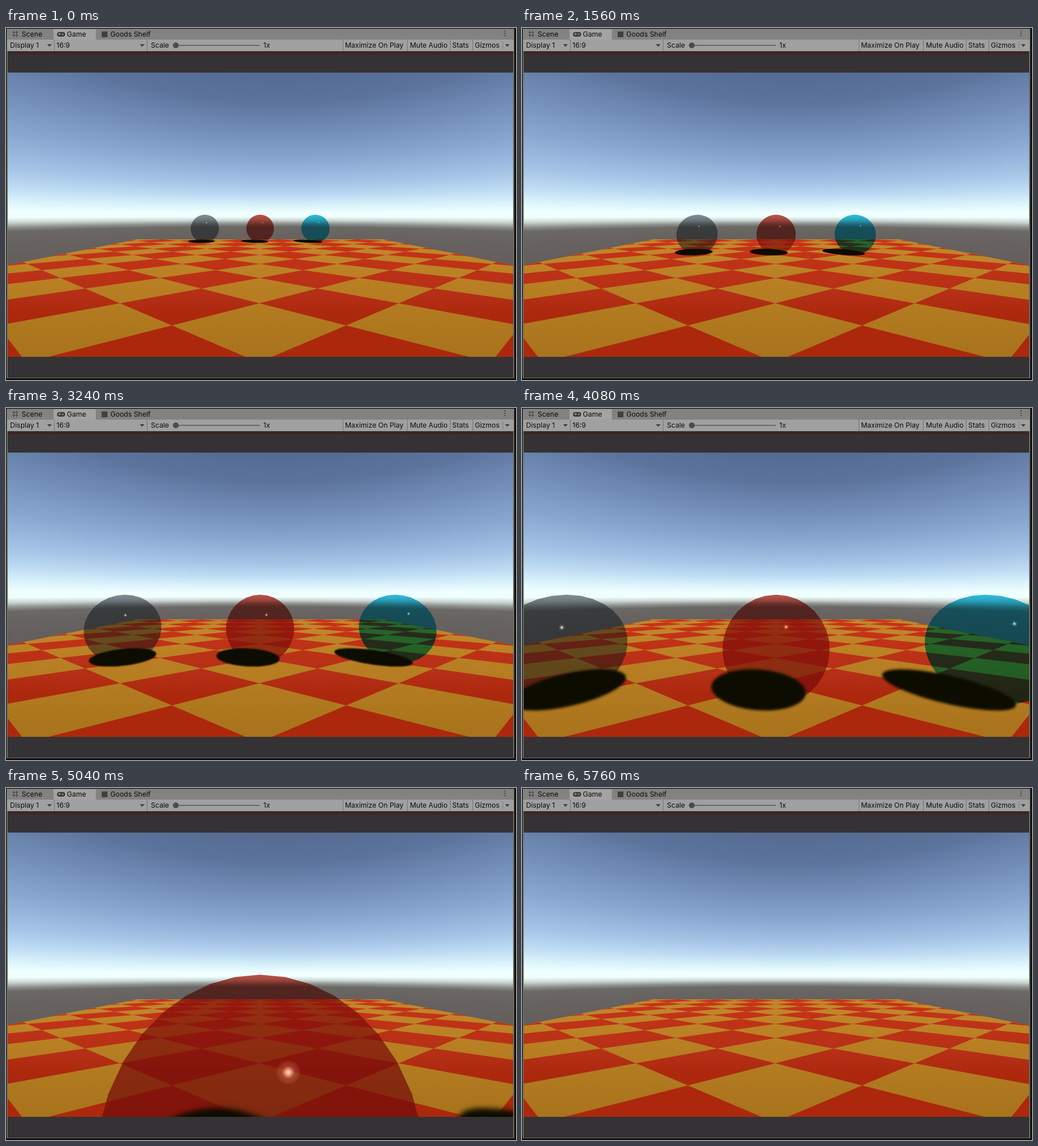
These frames come from a looping animation (880x608 px, 5850 ms). An HTML page with a canvas:

```html
<!DOCTYPE html>
<html>
<head>
<meta charset="utf-8">
<style>
html, body { margin: 0; width: 100%; height: 100%; overflow: hidden; background: #100f0a; }
canvas { display: block; }
</style>
</head>
<body>
<canvas id="stage" width="880" height="608"></canvas>
<script>
const LOOP = 5850, STEP = 60;
const CX = 438.5, CY = 322.5, FOCAL = 425.2, NEAR = 0.3, R = 0.5;
const VIEW = [3, 77, 872, 491];
const LIGHT = [0.321, 0.766, -0.557];
const ctx = document.getElementById('stage').getContext('2d');

// Seconds and distance of the balls from the camera
const PATH = [[0, 8.93], [1.56, 6.27], [2.22, 5.27], [3.24, 3.65], [4.08, 2.35], [5.04, 0.895], [5.76, -0.2]];
const BALLS = [
  { x: -2, tint: [128, 128, 136], glow: '235,225,215' },
  { x: 0, tint: [188, 72, 64], glow: '255,165,130' },
  { x: 2, tint: [44, 174, 206], glow: '150,220,240' }
];

const mix = (a, b, k) => a + (b - a) * k;
const rgb = c => `rgb(${c})`;

// Camera space (y up, z forward) to the stage
const project = ([x, y, z]) => [CX + FOCAL * x / z, CY - FOCAL * y / z];

function trace(c, pts) {
  c.beginPath();
  for (const p of pts) c.lineTo(...project(p));
  c.closePath();
}

const ring = (n, at) => Array.from({ length: n }, (_, i) => at(i / n * 2 * Math.PI));

function sample(stops, t) {
  let i = 1;
  while (i < stops.length - 1 && t > stops[i][0]) i++;
  const [a, b] = [stops[i - 1], stops[i]];
  const k = Math.min(1, Math.max(0, (t - a[0]) / (b[0] - a[0])));
  return a.slice(1).map((v, j) => mix(v, b[j + 1], k));
}

function drawSky(c) {
  const [x0, y0, w, h] = VIEW;
  const stops = [
    [-246, 84, 106, 146], [-195, 92, 116, 156], [-145, 112, 140, 182], [-95, 136, 166, 208],
    [-55, 164, 195, 230], [-32, 190, 220, 243], [-17, 216, 241, 250], [-4, 240, 255, 255],
    [3, 238, 255, 253], [9, 202, 214, 211], [15, 142, 144, 142], [20, 107, 105, 102],
    [30, 104, 100, 98], [80, 97, 90, 88]
  ];
  const img = c.createImageData(w, h);
  for (let y = 0, i = 0; y < h; y++) {
    for (let x = 0; x < w; x++, i += 4) {
      const above = y0 + y < CY;
      const u = (x0 + x - CX) / FOCAL - (above ? 0.08 : 0);
      img.data.set([...sample(stops, (y0 + y - CY) / Math.hypot(1, u)), 255], i);
    }
  }
  c.putImageData(img, x0, y0);
}

function drawFloor(c) {
  const shade = (...stops) => {
    const g = c.createLinearGradient(0, 365, 0, 568);
    stops.forEach(([k, col]) => g.addColorStop(k, col));
    return g;
  };
  c.save();
  c.beginPath();
  c.rect(...VIEW);
  c.clip();
  trace(c, [[-5, -1, 10], [5, -1, 10], [5, -1, 1], [-5, -1, 1]]);
  c.fillStyle = shade([0, '#c4882e'], [0.3, '#bb8024'], [1, '#a8731c']);
  c.fill();
  c.clip();
  c.fillStyle = shade([0, '#c83418'], [0.45, '#b53016'], [0.65, '#ac280d'], [1, '#ac280d']);
  const corner = (p, q) => [(p - q) * 0.7857 - 0.01, -1, 5 + (p + q) * 5 / 9];
  for (let p = -12; p < 12; p++) {
    for (let q = -12; q < 12; q++) {
      if ((p + q) % 2 === 0 || p + q < -8) continue;
      trace(c, [corner(p, q), corner(p + 1, q), corner(p + 1, q + 1), corner(p, q + 1)]);
      c.fill();
    }
  }
  c.restore();
}

function drawPanel(c) {
  const box = (col, x, y, w, h) => { c.fillStyle = col; c.fillRect(x, y, w, h); };
  const disc = (col, x, y, r) => {
    c.fillStyle = col;
    c.beginPath();
    c.arc(x, y, r, 0, 7);
    c.fill();
  };
  const arrow = x => {
    c.fillStyle = '#404040';
    c.beginPath();
    c.moveTo(x - 4, 28);
    c.lineTo(x + 4, 28);
    c.lineTo(x, 32.5);
    c.fill();
  };
  box('#100f0a', 0, 0, 880, 608);
  box('#6b6b60', 1, 1, 876, 604);
  box('#353235', 3, 2, 872, 602);
  box('#828282', 2, 2, 874, 18);
  box('#a3a3a3', 82, 2, 73, 18);
  box('#a0a0a0', 2, 20, 874, 20);
  box('#3c2826', 3, 41, 872, 5);
  for (const x of [83, 243, 581, 692, 766, 805]) box('#747474', x, 20, 1, 20);
  box('#808080', 857, 23, 1, 14);
  [75, 235, 865].forEach(arrow);
  box('#686868', 293, 29, 145, 2);
  disc('#4b4b4b', 293, 30, 5);

  for (const k of [0, 5]) {
    box('#404040', 13 + k, 5, 1, 11);
    box('#404040', 11, 7 + k, 10, 1);
  }
  c.fillStyle = '#3c3c3c';
  c.beginPath();
  c.roundRect(88, 7, 14, 8, 4);
  c.fill();
  box('#a3a3a3', 90, 10, 5, 1);
  box('#a3a3a3', 92, 8.5, 1, 4);
  disc('#a3a3a3', 98, 11, 1.2);
  box('#404040', 165, 6, 10, 10);
  for (const y of [5, 9, 13]) disc('#303030', 861, y, 1);

  c.font = '12px Inter, Roboto, sans-serif';
  c.fillStyle = '#0c0c0c';
  const labels = [
    ['Scene', 27, 15], ['Game', 105, 15], ['Goods Shelf', 180, 15],
    ['Display 1', 7, 34], ['16:9', 87, 34], ['Scale', 250, 34], ['1x', 444, 34],
    ['Maximize On Play', 585, 34], ['Mute Audio', 697, 34], ['Stats', 770, 34], ['Gizmos', 809, 34]
  ];
  for (const l of labels) c.fillText(...l);
}

const backdrop = document.createElement('canvas');
backdrop.width = 880;
backdrop.height = 608;
const back = backdrop.getContext('2d');
drawPanel(back);
drawSky(back);
drawFloor(back);

// Outline of the sphere as seen from the camera
function outline(x, d) {
  const dist = Math.hypot(x, R, d), tangent = Math.sqrt(dist * dist - R * R);
  const k = (tangent / dist) ** 2, rad = R * tangent / dist;
  const flat = Math.hypot(x, d) || 1e-6;
  const side = [d / flat, 0, -x / flat];
  const up = [R * x / flat / dist, flat / dist, R * d / flat / dist];
  return ring(30, a => [x, -R, d].map((v, i) =>
    v * k + rad * (Math.sin(a) * side[i] + Math.cos(a) * up[i])));
}

function drawBall({ x, tint }, d) {
  const pts = outline(x, d).filter(p => p[2] >= NEAR);
  if (pts.length < 3) return;
  ctx.save();
  const cut = R * R - (NEAR - d) ** 2;
  if (cut > 0) {
    // The near plane opens the front of the sphere
    ctx.beginPath();
    ctx.rect(0, 0, 880, 608);
    const [hx, hy] = project([x, -R, NEAR]), hr = Math.sqrt(cut) * FOCAL / NEAR;
    ctx.moveTo(hx + hr, hy);
    ctx.arc(hx, hy, hr, 0, 2 * Math.PI);
    ctx.clip('evenodd');
  }
  trace(ctx, pts);
  ctx.globalCompositeOperation = 'multiply';
  ctx.fillStyle = rgb(tint);
  ctx.fill();
  ctx.globalCompositeOperation = 'lighter';
  ctx.fillStyle = 'rgb(4,8,7)';
  ctx.fill();
  ctx.restore();
}

function drawShadow({ x }, d) {
  const pts = ring(90, a => {
    const long = 0.62 * Math.cos(a), wide = 0.475 * Math.sin(a);
    const z = d + 0.363 + 0.866 * long + 0.5 * wide;
    return [x - 0.21 - 0.5 * long + 0.866 * wide, -1, Math.max(z, 0.6)];
  });
  if (Math.max(...pts.map(p => p[2])) < 1.6) return;
  ctx.filter = `blur(${Math.min(5, 4.5 / d).toFixed(2)}px)`;
  ctx.fillStyle = '#0c0c00';
  trace(ctx, pts);
  ctx.fill();
  ctx.filter = 'none';
}

function drawGlint({ x, glow }, d) {
  let p = [x, -R, d];
  for (let i = 0; i < 8; i++) {
    const len = Math.hypot(...p) || 1;
    const half = LIGHT.map((l, j) => l - p[j] / len);
    const size = Math.hypot(...half);
    p = [x, -R, d].map((v, j) => v + R * half[j] / size);
  }
  if (p[2] < NEAR) return;
  const [gx, gy] = project(p), r = Math.max(1.7, 0.025 * FOCAL / p[2]);
  const g = ctx.createRadialGradient(gx, gy, 0, gx, gy, r);
  g.addColorStop(0, 'rgba(255,245,235,.95)');
  g.addColorStop(0.25, `rgba(${glow},.85)`);
  g.addColorStop(0.5, `rgba(${glow},.25)`);
  g.addColorStop(0.9, `rgba(${glow},.1)`);
  g.addColorStop(1, `rgba(${glow},0)`);
  ctx.fillStyle = g;
  ctx.beginPath();
  ctx.arc(gx, gy, r, 0, 7);
  ctx.fill();
}

function draw() {
  const step = Math.min(96, Math.floor(performance.now() % LOOP / STEP));
  const [d] = sample(PATH, step * STEP / 1000);
  ctx.drawImage(backdrop, 0, 0);
  ctx.save();
  ctx.beginPath();
  ctx.rect(...VIEW);
  ctx.clip();
  for (const part of [drawBall, drawShadow, drawGlint]) {
    for (const ball of BALLS) part(ball, d);
  }
  ctx.restore();
  requestAnimationFrame(draw);
}
draw();
</script>
</body>
</html>
```
